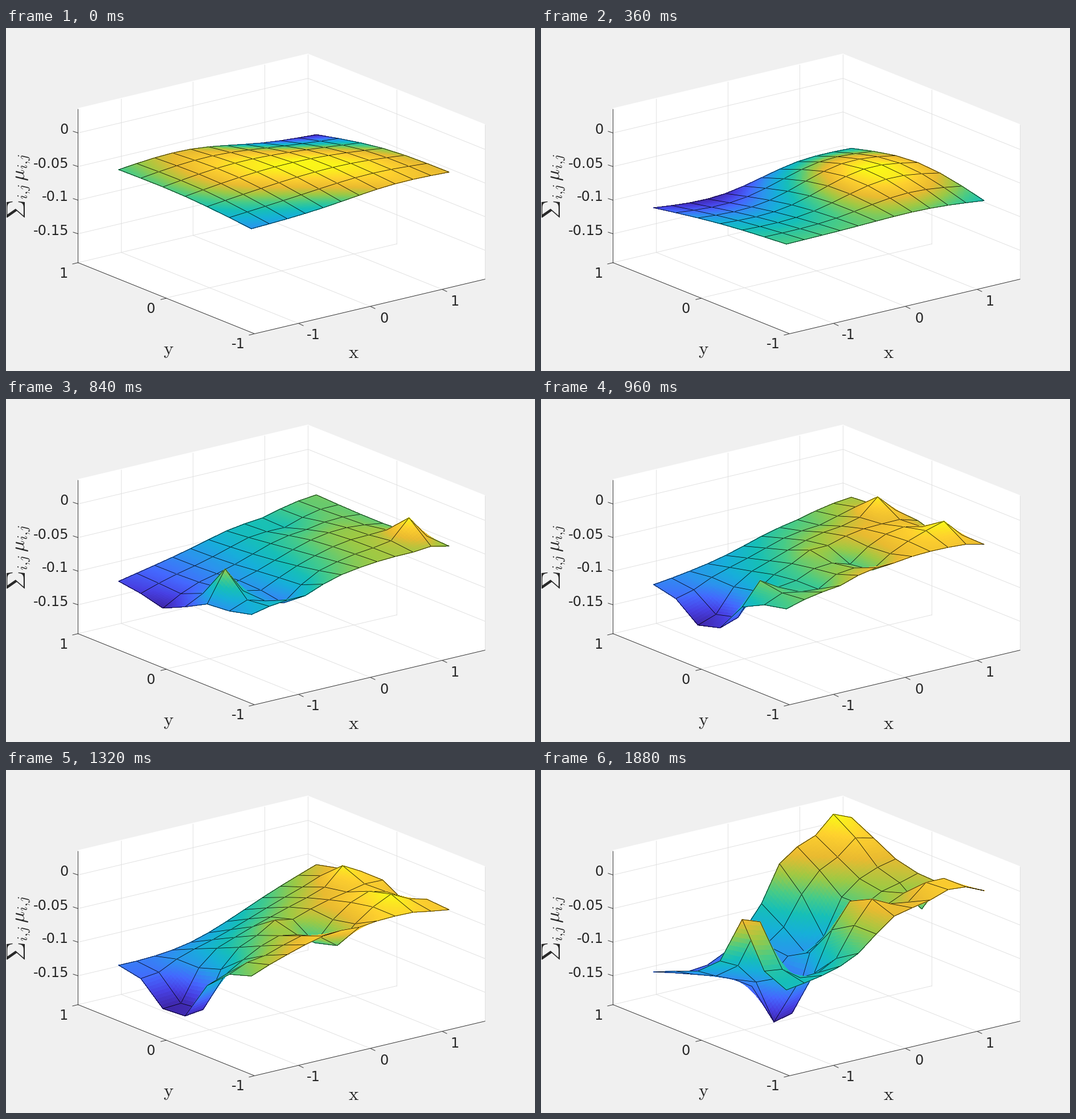
These frames come from a looping animation (929 px wide and 603 px high, 1920 ms). A matplotlib script:

```python
import numpy as np
import matplotlib.pyplot as plt
from matplotlib.animation import FuncAnimation
from matplotlib.collections import LineCollection, PolyCollection
from matplotlib.colors import LinearSegmentedColormap

W, H, DPI = 929, 603, 64
PX = 72 / DPI                 # points per pixel
TICK, LOOP = 40, 1920
NX, NY, SUB = 12, 7, 10       # mesh nodes and subdivisions per cell
DX, DY = np.array([31.55, -7.5]), np.array([38.83, 15.65])
LEFT = 198                    # screen x of the left corner node
INK, GRID = "#262626", "#dfdfdf"

plt.rcParams["font.family"] = "DejaVu Sans"
plt.rcParams["mathtext.fontset"] = "cm"

parula = LinearSegmentedColormap.from_list("parula", [
    "#3e26a8", "#4740e2", "#4468fe", "#2c92ee", "#16afd9", "#16bfb7",
    "#48cb86", "#9dc944", "#e9ba30", "#fed02e", "#f9fb15"])


def spline(knots, n):
    """Matrix of the natural cubic spline from knots to 0..n-1."""
    k = np.array(knots, float)
    m = len(k)

    def basis(a):
        return np.column_stack([abs(a[:, None] - k) ** 3, np.ones(len(a)), a])

    side = np.zeros((2, m + 2))
    side[0, :m], side[1, :m] = 1, k
    system = np.vstack([basis(k), side])
    return basis(np.arange(n, dtype=float)) @ np.linalg.solve(
        system, np.eye(m + 2)[:, :m])


ACROSS, DOWN = spline([0, 4, 8, 11], NX), spline([0, 3, 6], NY)
J, I = np.indices((NY, NX))


def sheet(back, middle, front):
    return DOWN @ np.array([back, middle, front], float) @ ACROSS.T


def bump(i, j, size, reach):
    return size * np.exp(-((I - i) ** 2 + (J - j) ** 2) / reach ** 2)


def mix(a, b, t):
    return a + (b - a) * t


# Levels in screen pixels, a larger level is deeper.
dome = sheet((249, 243, 262, 270), (249, 236, 237, 247), (259, 252, 240, 242))
hill = sheet((316, 321, 295, 294), (297, 294, 261, 272), (286, 284, 283, 292))
wave = sheet((354, 345, 294, 229), (338, 308, 258, 210), (283, 240, 229, 227))

slope = (sheet((307, 307, 273, 269), (291, 282, 250, 232), (286, 290, 266, 244))
         + bump(1, 5, 56, 0.6) + bump(10, 5, -34, 0.6))

ripple = (sheet((320, 293, 262, 251), (312, 285, 247, 254), (285, 258, 243, 248))
          + bump(0, 2, 20, 1) + bump(1, 4, -56, 0.7) + bump(3, 5, 27, 1)
          + bump(8, 1, 14, 1.2) + bump(10, 5, -41, 0.7))

pit = (sheet((335, 325, 278, 262), (315, 252, 230, 240), (261, 220, 220, 239))
       + bump(0.6, 2.6, 150, 1.2) + bump(0.5, 4.5, -30, 1)
       + bump(6, 4.5, 95, 1) + bump(5, 3, -20, 0.6)
       + bump(10, 2, -45, 0.7) + bump(9, 4.7, -38, 0.9) + bump(11, 4, 40, 0.6))

crags = (sheet((355, 350, 212, 174), (310, 340, 250, 217), (293, 261, 197, 202))
         + bump(3.5, 3, 110, 0.8) + bump(0.5, 4, -150, 0.8)
         + bump(7.3, 0.4, -38, 0.9) + bump(6.6, 2, 52, 1)
         + bump(10, 0.4, -34, 0.9) + bump(5.8, 4.4, -80, 1.3)
         + bump(9.5, 5, -34, 1) + bump(10, 4, 45, 0.6))

KEYS = [(0, dome), (160, mix(dome, hill, 0.45) + bump(1, 5, 77, 0.6)),
        (360, hill), (600, slope), (840, ripple),
        (1080, mix(ripple, pit, 0.75) + bump(10, 2, -31, 0.7)),
        (1160, pit), (1560, wave), (1880, crags)]
STEPS = [0, 80, 160, 360, 480, 600, 720, 840, 960, 1080, 1160,
         1320, 1440, 1560, 1640, 1720, 1880]


def levels(ms):
    t = max(s for s in STEPS if s <= ms)
    for (t0, a), (t1, b) in zip(KEYS, KEYS[1:]):
        if t <= t1:
            return mix(a, b, (t - t0) / (t1 - t0))


def tent(n):
    """Matrix of linear interpolation onto the subdivided mesh."""
    fine = np.linspace(0, n - 1, (n - 1) * SUB + 1)
    return np.maximum(0, 1 - abs(fine[:, None] - np.arange(n)))


FINE_X, FINE_Y = tent(NX), tent(NY)


def cells(p, n):
    """Quads of a node grid, grouped by mesh cell from back to front."""
    q = np.stack([p[:-1, :-1], p[:-1, 1:], p[1:, 1:], p[1:, :-1]], 2)[:, ::-1]
    q = q.reshape(NY - 1, n, NX - 1, n, 4, p.shape[-1])
    return q.transpose(0, 2, 1, 3, 4, 5).reshape(-1, n * n, 4, p.shape[-1])


def mesh(h):
    fine = FINE_Y @ h @ FINE_X.T
    j, i = np.indices(fine.shape) / SUB
    x = LEFT + DX[0] * i + DY[0] * j
    y = fine + DX[1] * i + DY[1] * j
    tone = (h.max() - fine) / (h.max() - h.min())
    patch = cells(np.dstack([x, y, tone]), SUB)
    rim = cells(np.dstack([x, y])[::SUB, ::SUB], 1)
    face = parula(patch[..., 2].mean(axis=2))
    blank = np.zeros((len(face), 1, 4))
    black = blank + (0, 0, 0, 1)
    verts = np.concatenate([patch[..., :2], rim], 1).reshape(-1, 4, 2)
    fill = np.concatenate([face, blank], 1).reshape(-1, 4)
    edge = np.concatenate([face, black], 1).reshape(-1, 4)
    return verts, fill, edge


fig = plt.figure(figsize=(W / DPI, H / DPI), dpi=DPI, facecolor="#f0f0f0")
ax = fig.add_axes([0, 0, 1, 1])
ax.set(xlim=(0, W), ylim=(H, 0))
ax.axis("off")


def lines(segments, color, width, z):
    ax.add_collection(LineCollection(
        np.array(segments) + 0.5, colors=color, linewidths=width * PX, zorder=z))


def label(x, y, text, size=24, **kw):
    kw = {"ha": "center", "va": "center", **kw}
    ax.text(x, y, text, fontsize=size * PX, color=INK, **kw)


box = [(126, 141), (530, 45), (841, 169), (841, 441), (436, 537), (126, 412)]
ax.add_patch(plt.Polygon(box, fc="white", ec="none", zorder=0))

grid = [[(530, 45), (530, 316)], [(686, 107), (686, 379)],
        [(841, 169), (841, 441)], [(281, 474), (686, 379)],
        [(126, 412), (530, 316)]]
ticks = []
for n in range(3):
    x, y = 202 + 126 * n, 394 - 30 * n
    grid += [[(x, y - 271), (x, y)], [(x, y), (x + 311.5, y + 125)]]
    ticks.append([(x + 311.5, y + 125), (x + 320, y + 129)])
    label(539.5 + 124.5 * n, 540 - 29.5 * n, str(n - 1))
    x, y = 126 + 155 * n, 412 + 62.5 * n
    ticks.append([(x, y), (x - 10, y + 2.5)])
    label(101 + 153.5 * n, 432 + 62 * n, str(1 - n))
for n, text in enumerate(["0", "-0.05", "-0.1", "-0.15"]):
    y = 184 + 59.1 * n
    grid += [[(126, y), (530, y - 96)], [(530, y - 96), (841, y + 29)]]
    ticks.append([(126, y), (117, y - 3)])
    label(110, 179.5 + 59 * n, text, ha="right")

lines(grid, GRID, 0.9, 1)
lines([[box[0], box[5]], [box[5], box[4]], [box[4], box[3]]] + ticks,
      INK, 0.9, 2)
label(611, 571, r"$\mathrm{x}$", 33)
label(285, 565.5, r"$\mathrm{y}$", 33)
label(21, 319, r"$\Sigma$", 47, rotation=90)
label(30, 261.5, r"${}_{i,\!j}\,\mu_{i,\!j}$", 34, rotation=90)

verts, fill, edge = mesh(dome)
count = SUB * SUB
groups = (NX - 1) * (NY - 1)
surface = PolyCollection(
    verts, facecolors=fill, edgecolors=edge, zorder=3,
    linewidths=([0.5 * PX] * count + [0.75 * PX]) * groups,
    antialiaseds=([False] * count + [True]) * groups)
surface.set_snap(False)
ax.add_collection(surface, autolim=False)


def draw(frame):
    verts, fill, edge = mesh(levels(frame * TICK))
    surface.set_verts(verts)
    surface.set_facecolor(fill)
    surface.set_edgecolor(edge)
    return [surface]


anim = FuncAnimation(fig, draw, frames=LOOP // TICK, interval=TICK,
                     repeat=True, repeat_delay=0)
plt.show()
```
